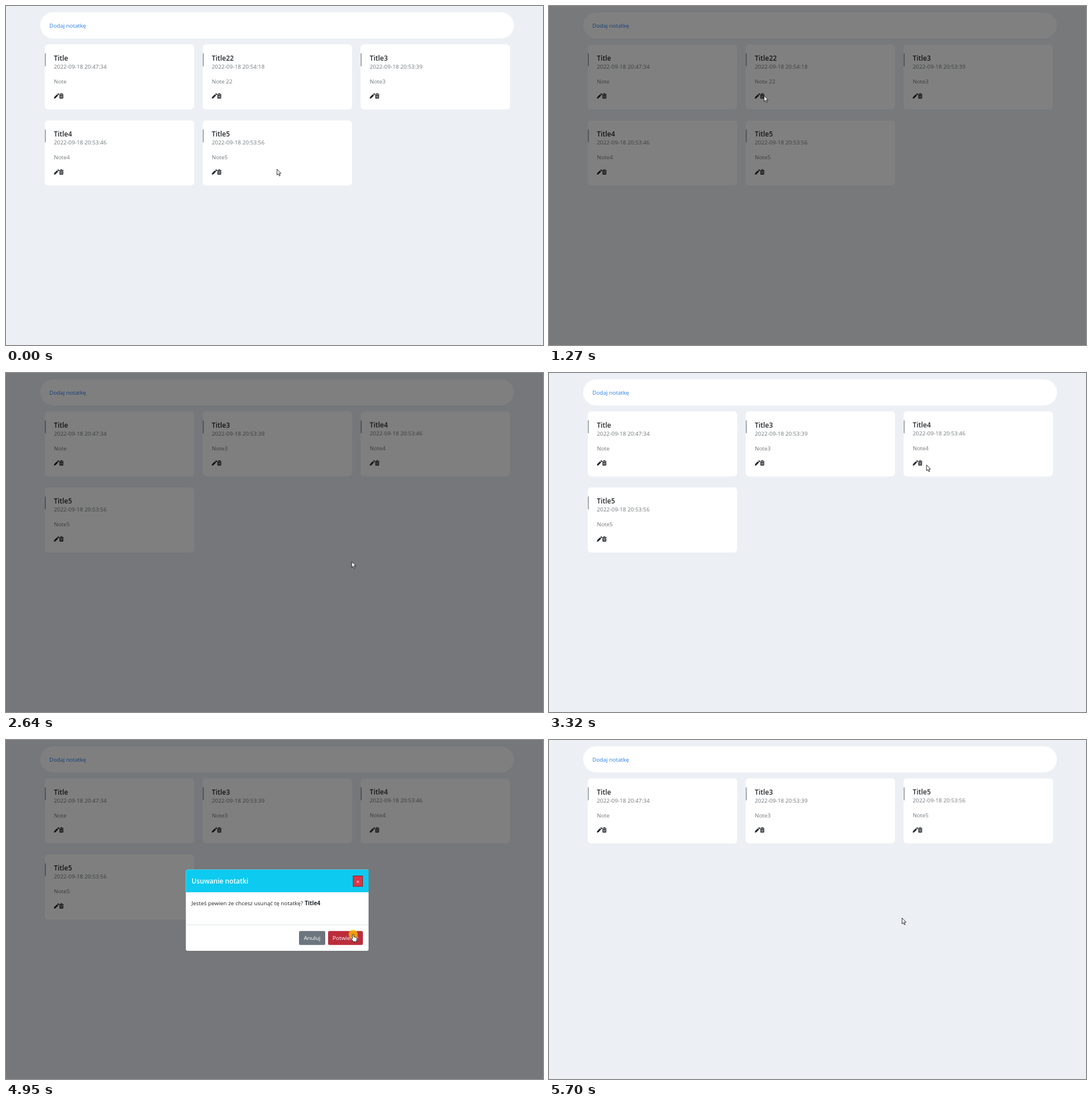
Animation of 942 by 595 pixels, one loop 6180 ms. Source, as an HTML page:

```html
<!DOCTYPE html>
<html lang="pl">
<head>
<meta charset="utf-8">
<title>Notatki</title>
<style>
  html, body { margin: 0; width: 100%; height: 100%; overflow: hidden; background: #ecf0f5; }
  svg { display: block; width: 100%; height: 100%; font: 9.8px "Open Sans", "Noto Sans", sans-serif; }
  .white { fill: #fff; }
  .link { fill: #267bf3; }
  .title { font-size: 11.9px; font-weight: 600; fill: #212529; }
  .muted { fill: #72787d; }
  .icon { fill: #212529; }
  .heading { font-size: 11.75px; font-weight: 600; fill: #fff; }
  .body { fill: #212529; }
  .strong { font-weight: 700; }
  .pointer { stroke: #15171a; stroke-width: .9; stroke-linejoin: round; fill: #fff; }
</style>
</head>
<body>
<svg viewBox="0 0 942 595">
  <defs>
    <g id="card">
      <rect class="white" width="262" height="114.3" rx="6"/>
      <rect y="16" width="2" height="22.5" fill="#a6abb2"/>
      <g class="icon">
        <path d="M16 95.3l.6-2.7 4.9-4.9 2.1 2.1-4.9 4.9zM22.1 87.1l.8-.8q.6-.5 1.2 0l1 1q.5.6 0 1.2l-.8.8z"/>
        <path fill-rule="evenodd" d="M25.2 87.2h2.1l.7-1.3h2.2l.7 1.3h2.1v1.2h-7.8zm2.9 0h2l-.3-.5h-1.4zM25.8 88.9h6.6v5.4q0 1.1-1.1 1.1h-4.4q-1.1 0-1.1-1.1zm1.4 1v4.2h.6v-4.2zm1.6 0v4.2h.6v-4.2zm1.6 0v4.2h.6v-4.2z"/>
      </g>
    </g>
  </defs>

  <rect width="942" height="595" fill="#ecf0f5"/>
  <rect class="white" x="60" y="11" width="831" height="46" rx="23"/>
  <text class="link" x="76" y="38">Dodaj notatkę</text>
  <g id="notes"></g>

  <rect id="backdrop" width="942" height="595" opacity="0"/>

  <g id="modal" opacity="0">
    <rect class="white" x="315.5" y="227.5" width="320.5" height="142.5" rx="3"/>
    <path d="M315.5 267.3V230.5q0-3 3-3h314.500q3 0 3 3v36.800z" fill="#0dcaf0"/>
    <text class="heading" x="325.500" y="252.300">Usuwanie notatki</text>
    <rect x="609" y="238.500" width="16.500" height="18.500" fill="#dc3545" stroke="#7c2630"/>
    <text class="white" x="617.200" y="251.500" text-anchor="middle">×</text>
    <text class="body" x="325.500" y="290">Jesteś pewien że chcesz usunąć tę notatkę?</text>
    <text class="body strong" id="first" x="524" y="290">Title22</text>
    <text class="body strong" id="second" x="524" y="290" opacity="0">Title4</text>
    <rect x="315.500" y="324" width="320.500" height="1" fill="#dee2e6"/>
    <rect id="cancel" x="514" y="335.300" width="46" height="24.500" rx="2.500" fill="#6c757d"/>
    <text class="white" x="537" y="351.300" text-anchor="middle">Anuluj</text>
    <rect id="confirm" x="565" y="335.300" width="61" height="24.500" rx="2.500" fill="#dc3545"/>
    <text class="white" x="595.500" y="351.300" text-anchor="middle">Potwierdź</text>
  </g>

  <g id="cursor">
    <circle id="press" r="8" fill="#ffc800" fill-opacity=".72" opacity="0"/>
    <path class="pointer" id="arrow" d="M.3 .3V10.700L2.600 8.500 4.300 12.300 5.900 11.600 4.200 7.800H7.400Z"/>
    <path class="pointer" id="hand" opacity="0" d="M-1.200 1Q0-.6 1.200 1V4.600L5.600 5.600Q6.800 6 6.700 7.400L5.800 13H.2L-3 8.400Q-3.200 6.800-1.200 7.600Z"/>
  </g>
</svg>
<script>
  const LOOP = 6180;
  const SWAPS = [2560, 5150];
  const $ = id => document.getElementById(id);

  // track: [ms, value] pairs, the first one at 0
  function play(el, prop, track, easing = 'linear') {
    const frames = [...track, [LOOP, track.at(-1)[1]]].map(
      ([ms, value]) => ({ offset: ms / LOOP, [prop]: value, easing }));
    el.animate(frames, { duration: LOOP, iterations: Infinity });
  }

  const move = (x, y) => `translate(${x}px, ${y}px)`;

  // on/off windows; ramp is the fade time at both ends
  function windows(el, prop, off, on, spans, ramp = 0) {
    const track = [[0, off]];
    for (const [from, to] of spans) {
      track.push([from, off], [from + ramp, on], [to, on], [to + ramp, off]);
    }
    play(el, prop, track);
  }

  // slots: position in the grid before and after each deletion, null when deleted
  const notes = [
    ['Title', '20:47:34', 'Note', [0, 0, 0]],
    ['Title22', '20:54:18', 'Note 22', [1, null, null]],
    ['Title3', '20:53:39', 'Note3', [2, 1, 1]],
    ['Title4', '20:53:46', 'Note4', [3, 2, null]],
    ['Title5', '20:53:56', 'Note5', [4, 3, 2]]
  ];

  const place = slot => slot === null
    ? move(-400, 0)
    : move(68 + slot % 3 * 277, 67.2 + Math.floor(slot / 3) * 133.5);

  for (const [title, time, body, slots] of notes) {
    const g = document.createElementNS('http://www.w3.org/2000/svg', 'g');
    g.innerHTML = `<use href="#card"/>
      <text class="title" x="16" y="28.800">${title}</text>
      <text class="muted" x="16" y="42.800">2022-09-18 ${time}</text>
      <text class="muted" x="16" y="68.800">${body}</text>`;
    $('notes').append(g);
    play(g, 'transform', slots.map((slot, i) => [i ? SWAPS[i - 1] : 0, place(slot)]), 'step-end');
  }

  const open = [[1280, 2440], [4020, 5030]];
  windows($('backdrop'), 'opacity', 0, .5, [[1122, 2740], [3862, 5350]], 150);
  windows($('modal'), 'opacity', 0, 1, open, 150);
  play($('modal'), 'transform', [
    [0, move(0, -33)],
    ...open.flatMap(([from, to]) => [
      [from, move(0, -33)], [from + 300, move(0, 0)],
      [to, move(0, 0)], [to + 300, move(0, -33)]
    ])
  ], 'ease-out');
  play($('first'), 'opacity', [[0, 1], [3300, 0]], 'step-end');
  play($('second'), 'opacity', [[0, 0], [3300, 1]], 'step-end');

  windows($('cancel'), 'fill', '#6c757d', '#5c636a', [[1740, 1855]], 100);
  windows($('confirm'), 'fill', '#dc3545', '#bb2d3b', [[1870, 2520], [4720, 5180]], 150);

  const path = [
    [0, 475, 286], [130, 476, 291], [330, 450, 262], [670, 384, 183],
    [850, 376, 157], [1300, 377, 157], [1450, 400, 195], [1650, 470, 285],
    [1800, 537, 339], [1890, 579, 345], [1960, 586, 346], [2220, 595, 347],
    [2470, 595, 347], [2700, 610, 325], [2970, 632, 290], [3150, 650, 215],
    [3320, 662, 161], [3520, 652, 157], [3870, 653, 158], [4000, 672, 202],
    [4150, 683, 250], [4340, 686, 290], [4520, 664, 322], [4720, 624, 340],
    [4900, 609, 341], [5080, 609, 341], [5350, 616, 322], [5600, 619, 312]
  ];
  play($('cursor'), 'transform', path.map(([ms, x, y]) => [ms, move(x, y)]));

  const pointing = [[1790, 2510], [4720, 5120]];
  windows($('hand'), 'opacity', 0, 1, pointing);
  windows($('arrow'), 'opacity', 1, 0, pointing);
  windows($('press'), 'opacity', 0, 1, [[1000, 1100], [2360, 2440], [3740, 3840], [4930, 5025]]);
</script>
</body>
</html>
```
